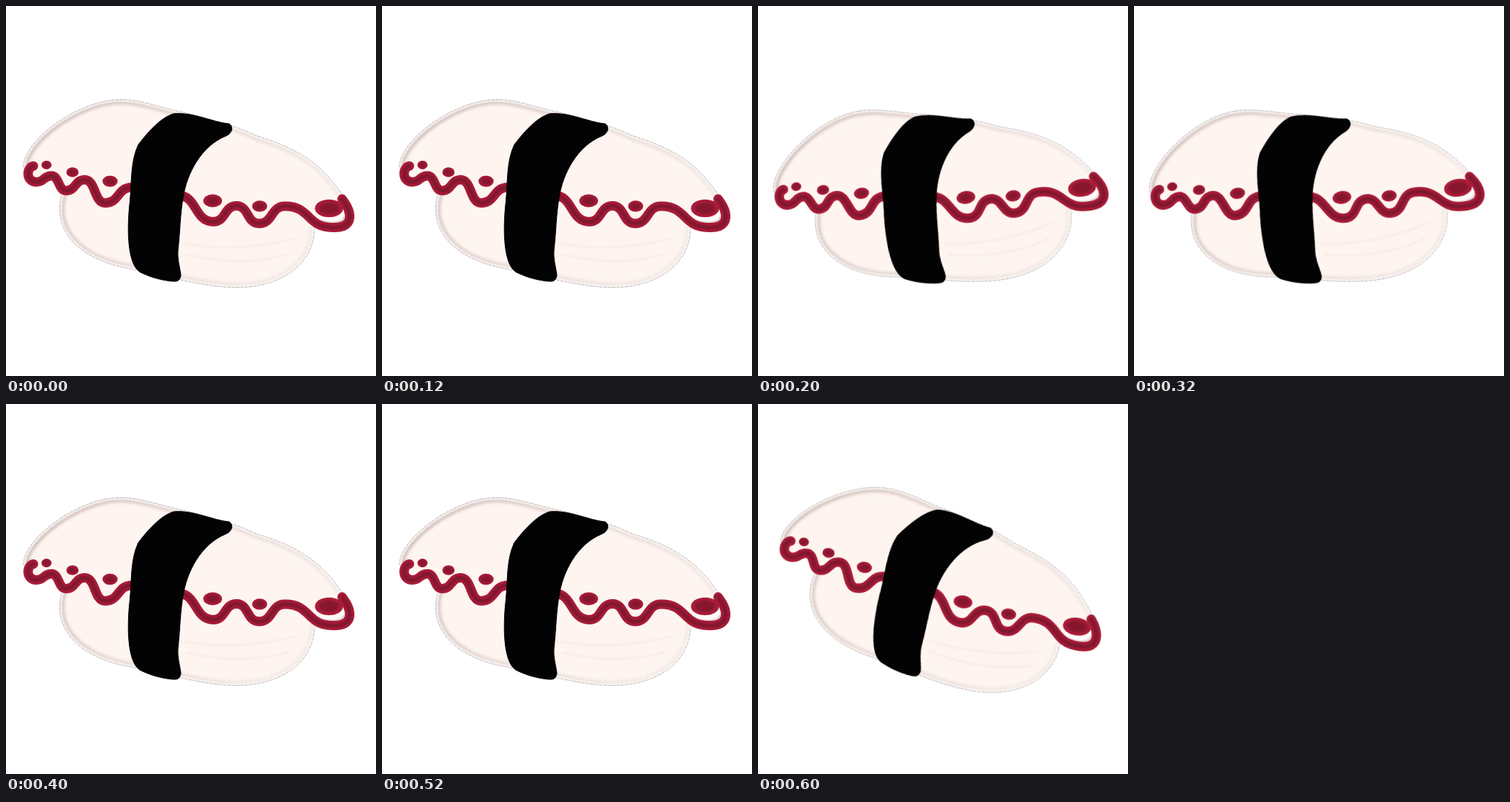
An HTML page that plays this animation: 512x512 px, repeating every 800 ms.

```html
<!DOCTYPE html>
<html lang="en">
<head>
<meta charset="utf-8">
<title>Rocking sushi</title>
<style>
  html, body { margin: 0; width: 100%; height: 100%; overflow: hidden; background: #fff; }
  svg { display: block; width: 100vw; height: 100vh; }
  #sushi { transform-origin: 256px 256px; animation: rock .8s step-end infinite; }
  @keyframes rock {
    0%, 50%, 100% { transform: rotate(0deg); }
    25% { transform: rotate(-8.5deg); }
    75% { transform: rotate(8.5deg); }
  }
  .line { fill: none; stroke-linecap: round; stroke-linejoin: round; }
  .flesh { fill: #fef5f1; }
  .shade { stroke: url(#shade); stroke-width: 13; filter: url(#soft2); }
  .rim { stroke: #f9f4f2; stroke-width: 6; filter: url(#soft1); }
  .edge { stroke: #808080; stroke-width: .8; stroke-linecap: butt; stroke-dasharray: 3 1 1 1; opacity: .7; }
  .streak { stroke: #f5e8e3; stroke-width: 2; filter: url(#soft1); }
  .halo { stroke: #d5c3c2; stroke-width: 3; filter: url(#soft1); }
  .glint { stroke: #fff; stroke-width: 4; filter: url(#soft1); }
  .sauce { stroke: #a81d39; stroke-width: 13; }
  .core { stroke: #80152f; stroke-width: 5.5; filter: url(#soft1); }
  .drop { fill: #a81d39; }
  .pit { fill: #86162f; filter: url(#soft1); }
  .nori { fill: #030303; stroke: #030303; }
</style>
</head>
<body>
<svg viewBox="0 0 512 512">
  <defs>
    <filter id="soft1" filterUnits="userSpaceOnUse" x="0" y="0" width="512" height="512"><feGaussianBlur stdDeviation="1"/></filter>
    <filter id="soft2" filterUnits="userSpaceOnUse" x="0" y="0" width="512" height="512"><feGaussianBlur stdDeviation="2"/></filter>
    <linearGradient id="shade" gradientUnits="userSpaceOnUse" x1="60" y1="150" x2="400" y2="350">
      <stop offset="0" stop-color="#cbb8b4"/>
      <stop offset=".45" stop-color="#e4d5d0"/>
      <stop offset="1" stop-color="#f2e8e4"/>
    </linearGradient>
    <path id="top" d="M24 223C24 186 100 129.5 158 129.5C190 129.5 220 143 246 147C280 156 315 164 345 179C400 196 435 215 466 262"/>
    <path id="base" d="M78 258C62 310 100 350 168 363C215 371 270 389.5 320 389.5C380 389.5 426 358 427 308"/>
    <path id="rice"/>
    <path id="shell"/>
    <path id="wave"/>
    <clipPath id="inRice"><use href="#rice"/></clipPath>
    <clipPath id="inShell"><use href="#shell"/></clipPath>
  </defs>

  <g id="sushi">
    <use href="#rice" class="flesh"/>
    <g clip-path="url(#inRice)">
      <use href="#base" class="line shade"/>
      <use href="#base" class="line rim"/>
      <path class="line streak" d="M246 329Q320 342 398 322M250 344Q330 362 392 343"/>
    </g>
    <use href="#base" class="line edge"/>

    <use href="#shell" class="flesh"/>
    <g clip-path="url(#inShell)">
      <use href="#top" class="line shade"/>
      <use href="#top" class="line rim"/>
      <path class="line halo" d="M422 292Q448 305 465 297Q472 291 468 278"/>
      <path class="line glint" d="M426 289Q448 301 463 293Q468 288 465 276"/>
    </g>
    <use href="#top" class="line edge"/>

    <use href="#wave" class="line sauce"/>
    <use href="#wave" class="line core"/>
    <g id="drops"></g>

    <path class="nori" d="M232 149C258 146 285 161 309 163C316 168 312 177 304 180C270 194 250 232 245 266C241 288 241 312 238 338C237 352 241 362 242 373C240 382 236 381 230 381C210 379 195 373 185 368C166 355 168 300 171.5 270C174 245 172 215 183 192C195 176 214 154 232 149Z"/>
  </g>
</svg>
<script>
  const get = id => document.getElementById(id);
  const outline = id => get(id).getAttribute('d');

  // Crests and troughs of the sauce, joined by curves that are level at each one
  const turns = [[42, 243.5], [63, 235], [83, 255.5], [109, 240.5], [137, 272.5], [174, 251],
    [238, 262], [287, 298.5], [319, 276.5], [350, 301], [386, 277], [452, 306.5]];

  const swing = pts => pts.slice(1).map(([x, y], i) => {
    const [px, py] = pts[i];
    const reach = (x - px) * .55;
    return `C${px + reach} ${py} ${x - reach} ${y} ${x} ${y}`;
  }).join('');

  get('wave').setAttribute('d',
    'M38 221.5C28 223 27 243.5 42 243.5' + swing(turns) + 'C482 308 480 286 465 267');
  get('shell').setAttribute('d',
    outline('top') + 'L474 296L452 306.5' + swing([...turns].reverse()) + 'Z');
  get('rice').setAttribute('d', outline('base') + 'L425 300L385 262L110 236L85 256Z');

  const drops = [[56, 220, 7], [92, 230, 8.5], [144, 242.5, 10.5],
    [286, 269.5, 13], [351, 277, 10.5], [447, 280, 19.5]];
  const oval = (kind, x, y, rx, ry) =>
    `<ellipse class="${kind}" cx="${x}" cy="${y}" rx="${rx}" ry="${ry}"/>`;
  get('drops').innerHTML = drops.map(([x, y, r]) => {
    const h = r / 2 + 2.5;
    return oval('drop', x, y, r, h) + oval('pit', x, y, r * .7, h * .65);
  }).join('');
</script>
</body>
</html>
```
